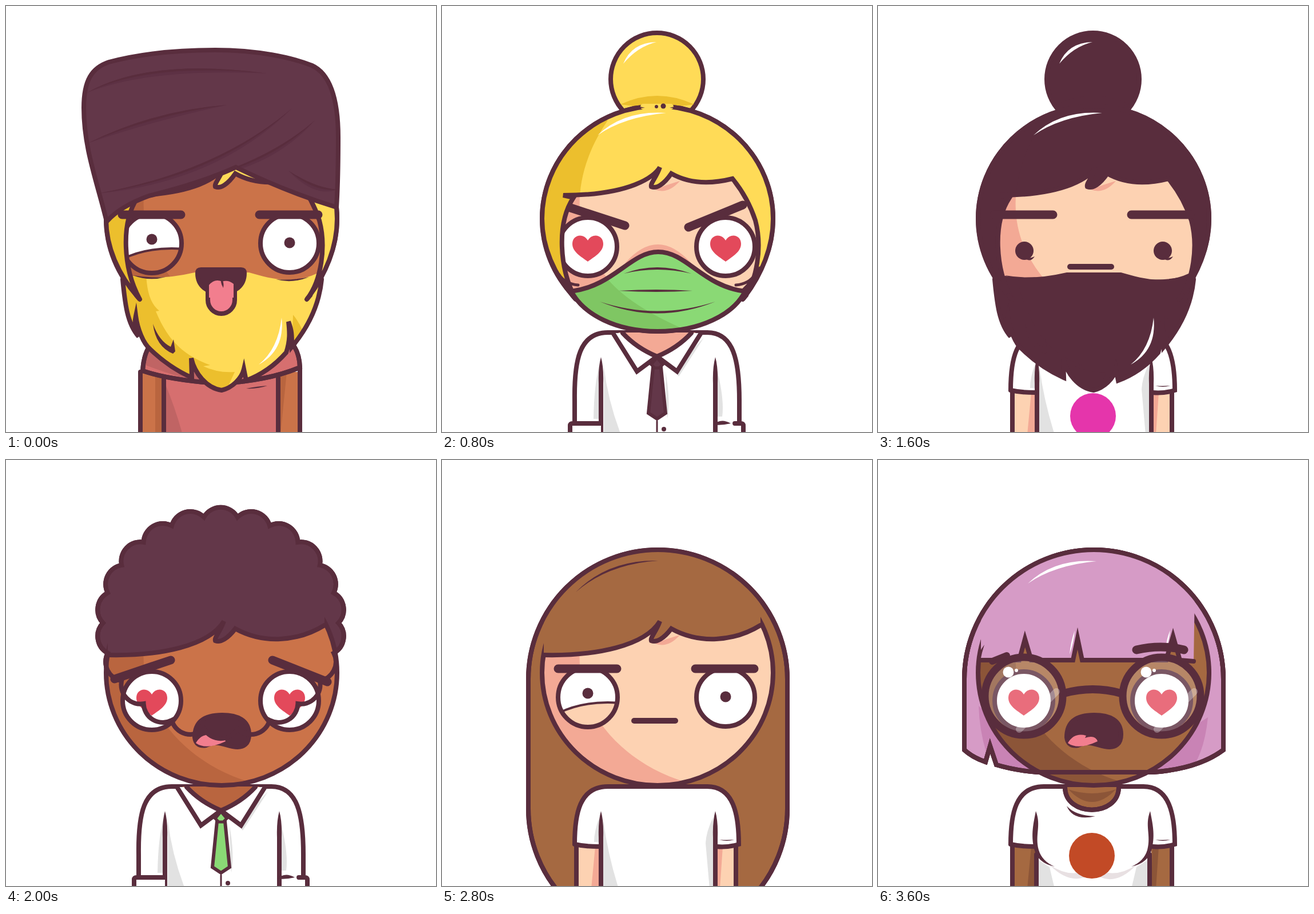
An HTML page for the animation above (4000 ms loop, 752 by 745 pixels).

```html
<!DOCTYPE html>
<html lang="en">
<head>
<meta charset="utf-8">
<title>Random faces</title>
<style>
html, body { margin: 0; width: 100%; height: 100%; overflow: hidden; background: #fff; }
svg { display: block; width: 100%; height: 100%; }
</style>
</head>
<body>
<svg id="stage" viewBox="0 0 752 745" stroke-linecap="round" stroke-miterlimit="6"></svg>
<script>
const INK = '#592d3d', WHITE = '#fff', GREY = '#e2e2e2';
const LIGHT = ['#fdd2b2', '#f3a995'], TAN = ['#cb7349', '#b9653f'], DEEP = ['#a56941', '#8c5538'];
const YELLOW = ['#ffdb57', '#ecbf2d'], LILAC = ['#d69bc6', '#c983b5'], BLACK = [INK, INK];
const PLUM = ['#633749', '#56293b'], GREEN = ['#8ad975', '#7fc663'];

// Drawing helpers
let clips = 0;
const path = (d, fill = 'none', w = 0, color = INK) =>
  `<path d="${d}" fill="${fill}" stroke="${w ? color : 'none'}" stroke-width="${w}"/>`;
const line = (d, w = 8, color = INK) => path(d, 'none', w, color);
const dot = (x, y, r, fill = INK, w = 0) =>
  `<circle cx="${x}" cy="${y}" r="${r}" fill="${fill}" stroke="${w ? INK : 'none'}" stroke-width="${w}"/>`;
const lens = (x1, y1, cx, cy, x2, y2, dx = 0, dy = 8, color = INK) =>
  path(`M${x1} ${y1}Q${cx} ${cy} ${x2} ${y2}Q${cx + dx} ${cy + dy} ${x1} ${y1}`, color);
const mirror = art => `<g transform="matrix(-1 0 0 1 752 0)">${art}</g>`;
const move = (x, y, art) => `<g transform="translate(${x} ${y})">${art}</g>`;
const inside = (d, art) => {
  const id = 'clip' + clips++;
  return `<clipPath id="${id}"><path d="${d}"/></clipPath><g clip-path="url(#${id})">${art}</g>`;
};

// Head
const HEAD = 'M175 372A202 197 0 0 1 579 372A202 197 0 0 1 175 372Z';
const CRESCENT = 'M290 200C235 280 230 360 255 420C285 490 350 540 425 563L377 600H100V150Z';
const head = ([base, shade]) =>
  path(HEAD, base) + inside(HEAD, path(CRESCENT, shade)) + line(HEAD);
const tuftShade = ([, shade]) => lens(372, 321, 395, 312, 416, 306, 0, 18, shade);

// Bodies
const spike = x => path(`M${x} 614Q${x + 5} 632 ${x + 4} 660V750H${x - 4}V660Q${x - 5} 632 ${x} 614`, INK);
const TRUNK = 'M235 750V690C235 620 243 571 288 571H464C505 571 514 630 514 690V750';
const armShade = shade =>
  path('M276 622Q261 650 261 750H274V622M477 622Q492 650 492 750H478V622', shade);

function bare([base, shade]) {
  const abs = [[320, 664, 431], [333, 689, 419], [331, 715, 421]];
  return path(TRUNK, base) + armShade(shade) +
    path('M281 627Q290 680 309 750H278V627', shade) +
    lens(275, 573, 376, 613, 478, 573, 0, -40, shade) +
    lens(376, 626, 373, 700, 376, 770, 6, 0, shade) +
    abs.map(([a, y, b]) => lens(a, y, 376, y - 4, b, y, 0, 8, shade)).join('') +
    dot(314, 634, 8) + dot(437, 634, 8) + line(TRUNK) + spike(276) + spike(476);
}

function robe([base, shade]) {
  const cape = 'M239 638Q241 605 255 590H500Q513 605 514 632Q460 655 376 660Q290 655 239 638Z';
  return path('M235 750V640H514V750', base) + path('M261 640H272V750H261M480 640H491L480 750', shade) +
    path('M276 640H476V750H276', '#d66f6f') + path('M278 660Q295 700 309 750H278', '#c06464') +
    line('M235 750V640M514 750V632M276 650V750M476 650V750') + path(cape, '#d66f6f', 8) +
    inside(cape, path('M244 628Q300 650 340 655L330 635L250 595Z', '#c06464')) + line(cape) +
    lens(420, 669, 440, 670, 457, 664, 0, -5);
}

const badge = (x, y, color) => dot(x, y, 40, color);
const pinkBadge = badge(376, 717, '#e535ab');

function shirt([, shade], tie, print = '') {
  const trunk = 'M232 730V690C231 620 240 571 290 571H464C510 571 520 620 520 690V730';
  const flap = path('M299 572L341 639L376 613Q340 598 316 572', WHITE, 8);
  return path(trunk, WHITE) +
    path('M283 630Q290 690 313 750H283M276 625Q266 660 265 722H274M482 640Q494 690 490 718H482', GREY) +
    print + line(trunk) + path('M308 571H444L376 612Z', shade) +
    path('M458 580L414 648L405 636Z', GREY) + flap + mirror(flap) + spike(278) + spike(478) +
    path('M224 752V734Q224 730 229 730H278V752', WHITE) +
    line('M224 752V734Q224 730 229 730H278M527 752V734Q527 730 522 730H512') +
    lens(474, 732, 488, 720, 505, 730, 0, 14) +
    line('M376 726V750', 3) + dot(388, 740, 4) + lens(391, 640, 400, 690, 394, 722, -8, 0, GREY) +
    path('M369 632H383L391 712L376 722L361 712Z', tie[0], 6) +
    path('M376 615L386 627L380 633H372L366 627Z', tie[0], 5);
}

const sleeves = ([base, shade]) =>
  path('M235 670H277V750H235M478 670H514V750H478', base) +
  path('M268 676H275V750H261M480 676H491L486 750H478', shade) + line('M235 672V750M514 672V750') +
  path('M232 672C232 620 240 571 290 571H464C510 571 519 620 519 672Q500 678 480 676H274Q250 676 232 672', WHITE, 8) +
  path('M278 600H478V750H278', WHITE) + lens(485, 664, 498, 668, 511, 664, 0, -3);

const tee = (skin, print) => sleeves(skin) +
  path('M282 630Q290 690 309 750H282M474 625Q462 650 461 670L468 750H474M275 625Q266 650 266 668H274', GREY) +
  print + spike(278) + spike(478);

function curvyTee(skin, print) {
  const side = path('M276 614C286 640 274 655 281 682Q287 702 309 711Q279 705 273 680C267 655 272 635 276 614', INK) +
    line('M277 690V750') + path('M281 700L300 712L309 750H281', GREY);
  return sleeves(skin) + path('M300 708Q340 735 376 712Q412 735 452 708Q412 750 376 722Q340 748 300 708', '#e8e0e2') +
    side + mirror(side) + print + path('M327 572C327 625 421 625 421 572', skin[0], 8) +
    lens(333, 576, 374, 620, 416, 576, 0, -30, skin[1]) + line('M327 572C327 625 421 625 421 572') +
    lens(330, 605, 345, 622, 380, 623, -4, 10);
}

// Hair
const SWOOP = 'C388 312 375 320 366 316C364 310 375 300 381 282C372 298 330 331';
const BANGS = 'L516 308L504 350H357L349 312L341 350H268L257 313L247 350';
const capPath = fringe => 'M234 513C195 470 175 420 175 372A202 197 0 0 1 579 372C579 420 560 470 526 513' +
  `C552 480 560 420 548 375Q535 335 ${fringe}C200 380 205 460 234 513Z`;
const swoopCap = capPath(`508 302Q445 318 401 293${SWOOP} 212 331L230 335`);
const bangsCap = capPath(`528 350${BANGS}L226 342`);
const shine = (color = WHITE) => lens(272, 226, 318, 182, 392, 187, 0, 12, color);
const bangShine = lens(335, 340, 337, 318, 344, 298, 5, 2, WHITE) + lens(504, 328, 504, 314, 511, 298, 5, 2, WHITE);

const cap = (d, [base, shade]) =>
  path(d, base) + inside(d, path(CRESCENT, shade)) + line(d) + line('M234 513L228 506M526 513L532 506');
const bun = ([base, shade]) =>
  dot(376, 128, 81, base, 8) + lens(312, 172, 376, 142, 441, 172, 0, 40, shade) +
  lens(317, 101, 332, 64, 375, 63, 10, 7, WHITE);
const bunTie = line('M352 176H400', 10, YELLOW[0]) + dot(375, 176, 3) + dot(387, 175, 4.5) +
  lens(305, 187, 330, 171, 355, 178) + lens(398, 178, 420, 171, 447, 187);

const LONG = 'M151 383A226.5 226 0 0 1 604 383V610A226.5 226 0 0 1 151 610Z';
const BOB = 'M151 383A226.5 226 0 0 1 604 383V507Q560 540 480 546H280Q240 543 207 533L196 500L188 528Q165 520 151 507Z';
const longSwoop = `M557 289C510 318 450 322 401 295${SWOOP} 270 343 178 341`.replace('C372 298 330 331 270 343', 'C355 325 270 343');
const longBangs = `M552 352L528 350${BANGS}L180 350`;
const front = (back, fringe, [base]) =>
  inside(back, path(`${fringe}V50H557Z`, base) + line(fringe)) + line(back);
const bobShade = inside(BOB, path('M176 430Q178 490 200 540L290 548L230 480ZM577 450Q572 500 555 530L480 548L530 480Z', LILAC[1]));

function puff(cx, cy, rx, ry, n = 22) {
  let d = '';
  for (let i = 0; i <= n; i++) {
    const a = i / n * 2 * Math.PI, r = Math.PI * (rx + ry) / n * .6;
    const p = `${(cx + rx * Math.cos(a)).toFixed(1)} ${(cy + ry * Math.sin(a)).toFixed(1)}`;
    d += i ? `A${r} ${r} 0 0 1 ${p}` : 'M' + p;
  }
  return d + 'Z';
}
const CURLS = puff(372, 330, 203, 190), AFRO = puff(375.5, 285, 206, 187);

function turban() {
  const d = 'M176 377C160 310 136 250 136 178C136 130 150 108 180 98C240 82 310 77 366 77C440 77 500 90 535 104' +
    'C570 120 581 170 581 230C581 280 580 320 578 352Q490 325 402 282Q340 310 250 332Q200 350 176 377Z';
  const folds = [[141, 152, 250, 90, 457, 118], [143, 240, 260, 182, 387, 173], [160, 328, 370, 290, 500, 179],
    [350, 300, 470, 262, 540, 200], [579, 321, 540, 318, 494, 288]];
  return path(d, PLUM[0]) + inside(d, folds.map(f => lens(...f, 0, 18, '#5d3144') + lens(...f)).join('')) + line(d);
}

const sideHair = path('M205 272C185 258 175 285 163 310C150 340 130 368 95 376Q120 400 152 393C158 420 150 440 126 456' +
  'C150 462 175 460 184 446C205 400 210 330 205 272Z', LILAC[0], 8) +
  lens(149, 374, 160, 386, 153, 400, -6, 2) + lens(204, 277, 184, 300, 181, 334, 10, 4) + lens(179, 382, 179, 405, 186, 425, 10, 0);
const wrinkles = ([, shade]) => [226, 247].map(y =>
  lens(322, y - 1, 376, y + 13, 430, y - 1, 0, -8, shade) + lens(320, y, 376, y - 32, 432, y, 0, 12)).join('');

// Lower face
function beard([base, shade]) {
  const edge = 'M204 478C208 520 212 556 232 578C226 565 224 556 227 542C230 565 240 590 252 600Q285 632 325 650' +
    'L324 616C330 642 350 668 377 672C395 668 412 652 416 635L420 655Q460 640 490 606C497 585 496 570 494 552' +
    'C500 568 500 575 500 596C530 560 548 520 552 478';
  const d = edge + 'L543 468C500 488 460 476 425 466H330Q270 480 221 472Z';
  return path(d, base) + inside(d,
      path('M200 470H245C247 500 252 520 268 533L262 534C285 590 315 612 357 628L345 630Q370 642 400 640L377 690L200 640ZM502 540Q512 552 518 566L500 600Z', shade)) +
    line(edge) + path('M257 556Q268 586 288 596L293 583L296 604L292 608Q262 596 257 556', INK) +
    lens(482, 545, 488, 602, 442, 627, -12, -2, WHITE) +
    lens(222, 471, 250, 476, 279, 474, 0, 6) + lens(472, 478, 500, 480, 530, 474, 0, 6);
}

function mask([base, shade], skin) {
  const d = 'M226 499C300 490 330 430 378 430C428 430 456 490 530 499C510 540 450 569 377 569C305 569 248 540 226 499Z';
  const strap = line('M205 470Q215 486 238 488M196 458Q208 480 226 497', 5);
  return lens(320, 450, 377, 384, 436, 450, 0, 50, skin[1]) + strap + mirror(strap) + path(d, base) +
    inside(d, path('M290 478Q330 525 425 566L228 600V478', shade)) + line(d) +
    lens(318, 468, 376, 446, 436, 468) + lens(309, 498, 376, 494, 438, 498) + lens(276, 517, 376, 550, 478, 517);
}

// Eyes
const EYES = [255, 496];
const heart = (x, y) => move(x, y,
  path('M0 23C-12 14 -27 6 -27 -8C-27 -24 -8 -28 0 -14C8 -28 27 -24 27 -8C27 6 12 14 0 23Z', '#e3495b'));
const hearts = EYES.map(x => dot(x, 421, 51, WHITE, 8) + heart(x, 424)).join('');
function squint(skin) {
  const rim = 'M203 415A52 52 0 0 1 307 415A52 52 0 0 1 203 415Z';
  return path(rim, WHITE) + inside(rim, path('M205 442Q250 420 312 425V480H205Z', skin[0], 4)) + line(rim) +
    dot(255, 408, 9.5) + dot(496, 415, 51, WHITE, 8) + dot(496, 414, 9.5);
}
const dots = [256, 498].map(x => dot(x, 428, 16) + lens(x, 440, x + 10, 442, x + 18, 438)).join('');
const arches = line('M223 432V412C223 372 284 372 284 412V432M469 432V412C469 372 530 372 530 412V432', 9);
const wink = dot(255, 420, 52, WHITE, 8) + dot(255, 421, 9.5) + line('M452 421H538', 12) + lens(484, 431, 498, 432, 511, 431, 0, 6);

// Brows
const flat = line('M203 365H306M443 365H546', 15);
const angry = line('M225 353L320 384M431 387L526 348', 15);
const sad = line('M190 383L288 350M466 350L562 388', 15);
const raised = line('M452 332Q495 322 535 332', 15) + line('M200 352L225 342', 12);

// Mouths
const tongueOut = path('M335 467Q335 461 341 461H411Q417 461 417 467C417 490 400 502 376 502C352 502 335 490 335 467Z', INK, 8) +
  path('M353 486V514A23.5 24 0 0 0 400 514V486Q388 474 377 482Q365 474 353 486Z', '#f27e8e', 8) +
  path('M355 488Q365 476 378 482Q388 478 398 486V510H355Z', '#f27e8e') + lens(377, 478, 382, 483, 380, 493, -8, 0);
const straight = line('M336 456H408', 10);
const grin = path('M329 468C329 440 360 445 376 455C392 445 425 440 425 468C425 490 400 501 377 501C352 501 329 490 329 468Z', WHITE, 8) +
  line('M359 450V496M396 450V496');
const gasp = path('M330 485C330 455 350 446 378 446C405 446 425 455 425 480C425 497 415 502 405 502C385 502 372 488 350 499Q332 502 330 485Z', INK, 8) +
  path('M332 495Q343 476 364 482L362 486Q380 480 384 492Q350 508 332 495Z', '#f27e8e');

// Glasses
const smallGlasses = line('M314 447Q376 424 437 447') + [288, 462].map(x =>
  dot(x, 447, 25, 'rgba(255,230,215,.45)', 8) +
  line(`M${x - 6} 464L${x + 17} 446`, 8, 'rgba(255,255,255,.3)') +
  dot(x - 9, 436, 5, WHITE) + dot(x - 1, 432, 2, WHITE)).join('');
const bigGlasses = line('M325 408Q376 394 425 408', 14) + EYES.map(x =>
  dot(x, 413, 68, 'rgba(255,255,255,.2)', 13) +
  line(`M${x - 8} 471L${x + 57} 405`, 12, 'rgba(255,255,255,.3)') +
  dot(x - 27, 371, 9.5, WHITE) + dot(x - 13, 368, 3, WHITE)).join('');

// Characters, drawn back to front
const cast = [
  [robe(TAN), head(TAN), squint(TAN), beard(YELLOW), tongueOut, cap(swoopCap, YELLOW), turban(), flat],
  [path(LONG, YELLOW[0], 8), bare(LIGHT), head(LIGHT), tuftShade(LIGHT), squint(LIGHT), front(LONG, longSwoop, YELLOW),
    lens(234, 231, 290, 174, 378, 176), mask(PLUM, LIGHT), flat, smallGlasses],
  [bun(YELLOW), shirt(LIGHT, PLUM), head(LIGHT), tuftShade(LIGHT), hearts, cap(swoopCap, YELLOW), shine(), bunTie,
    mask(GREEN, LIGHT), angry],
  [path(CURLS, DEEP[0], 8), tee(LIGHT, ''), head(LIGHT), tuftShade(LIGHT), dots, grin, front(CURLS, longSwoop, DEEP), flat],
  [bun(BLACK), tee(LIGHT, pinkBadge), head(LIGHT), tuftShade(LIGHT), dots, beard(BLACK), straight, cap(swoopCap, BLACK),
    shine(), flat],
  [path(AFRO, PLUM[0], 8), shirt(TAN, GREEN), head(TAN), hearts, gasp, front(AFRO, longSwoop, PLUM), sad],
  [bare(LIGHT), head(LIGHT), arches, beard(DEEP), lens(215, 356, 376, 358, 540, 356, 0, 6, LIGHT[1]),
    cap(bangsCap, DEEP), bangShine, shine(), angry, grin, smallGlasses],
  [path(LONG, DEEP[0], 8), tee(LIGHT, ''), head(LIGHT), tuftShade(LIGHT), squint(LIGHT), straight,
    front(LONG, longSwoop, DEEP), lens(234, 231, 290, 174, 378, 176), flat],
  [shirt(LIGHT, GREEN, pinkBadge), head(LIGHT), wrinkles(LIGHT), wink, sideHair, mirror(sideHair), sad, grin, smallGlasses],
  [path(BOB, LILAC[0], 8), bobShade, line(BOB), curvyTee(DEEP, badge(374, 692, '#c24a26')), head(DEEP), hearts, gasp,
    front(BOB, longBangs, LILAC), bangShine, move(-10, -10, shine()),
    lens(186, 323, 165, 350, 175, 385, 12, 0), lens(573, 338, 590, 365, 577, 400, -12, 0), raised, bigGlasses]
].map(parts => parts.join(''));

const STEP = 400, stage = document.getElementById('stage');
let shown = -1;
function draw(now) {
  const i = Math.floor(now / STEP) % cast.length;
  if (i !== shown) stage.innerHTML = cast[shown = i];
  requestAnimationFrame(draw);
}
draw(performance.now());
</script>
</body>
</html>
```
